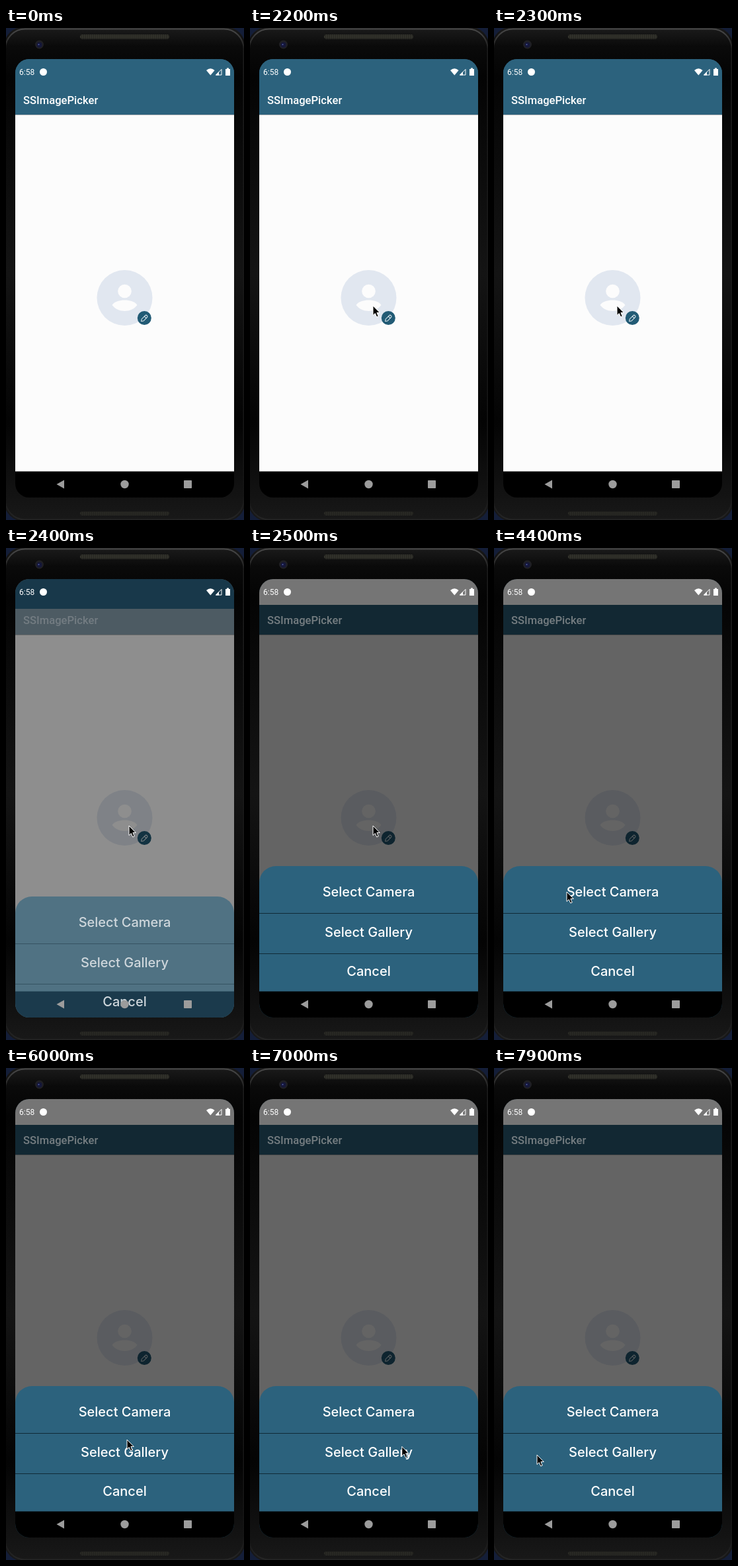
An HTML page for the animation above (8 s loop, 360 by 744 pixels).

```html
<!DOCTYPE html>
<html lang="en">
<head>
<meta charset="utf-8">
<title>Image picker sheet</title>
<style>
  html, body { margin: 0; width: 100%; height: 100%; overflow: hidden; background: #000; }
  svg { display: block; }
  .roboto { font-family: Roboto, sans-serif; }
  #labels text { font: 500 20px Inter, sans-serif; text-anchor: middle; }
</style>
</head>
<body>
<svg width="360" height="744" viewBox="0 0 360 744">
  <defs>
    <clipPath id="screen"><rect x="14" y="47" width="331" height="663" rx="21"/></clipPath>
    <linearGradient id="body" x2="0" y2="1">
      <stop offset="0" stop-color="#1c1c1c"/>
      <stop offset=".04" stop-color="#0a0a0a"/>
      <stop offset=".1" stop-color="#040404"/>
      <stop offset=".5" stop-color="#141414"/>
      <stop offset=".8" stop-color="#040404"/>
      <stop offset=".95" stop-color="#131313"/>
      <stop offset="1" stop-color="#191919"/>
    </linearGradient>
    <linearGradient id="edge" x2="0" y2="1">
      <stop offset="0" stop-color="#4a4a4a"/>
      <stop offset=".04" stop-color="#1c1c1c"/>
      <stop offset=".95" stop-color="#151515"/>
      <stop offset="1" stop-color="#262626"/>
    </linearGradient>
    <pattern id="mesh" width="3" height="3" patternUnits="userSpaceOnUse">
      <rect width="3" height="3" fill="#272722"/><circle cx="1.5" cy="1.5" r=".8" fill="#48483e"/>
    </pattern>
  </defs>

  <!-- phone -->
  <rect width="360" height="744" fill="#141e38"/>
  <rect x="-3" y="-2" width="365" height="748" rx="30" fill="url(#body)"/>
  <rect x="-1" y="1.5" width="360.500" height="742" rx="30" fill="none" stroke="url(#edge)" stroke-width="2"/>
  <rect x="112" y="10" width="135" height="6.5" rx="3" fill="url(#mesh)"/>
  <rect x="112" y="731" width="135" height="6" rx="3" fill="url(#mesh)" opacity=".65"/>
  <circle cx="50.5" cy="25" r="6.5" fill="#202024"/>
  <circle cx="50.5" cy="25.5" r="4" fill="#15173a"/>
  <circle cx="49.5" cy="25" r="1" fill="#5260a8"/>

  <g clip-path="url(#screen)">
    <!-- page -->
    <rect x="14" y="131" width="332" height="540" fill="#fcfcfc"/>
    <circle cx="179.5" cy="408" r="42" fill="#e1e7f0"/>
    <g fill="#fcfcfc">
      <circle cx="179.5" cy="398" r="10.3"/>
      <path d="M160.5 419C164 413.500 172 411.500 179.500 411.500S195 413.500 198.500 419C194 425 187 428 179.500 428S165 425 160.500 419z"/>
    </g>
    <circle cx="209.300" cy="438.500" r="10.500" fill="#225b75"/>
    <g transform="translate(209 439.200) rotate(45)" fill="none" stroke="#e8f0f4" stroke-width="1">
      <path d="M-2 3.500V-4.500a2 1.500 0 0 1 4 0V3.500L0 6zM-2 -2.500H2"/>
    </g>
    <rect id="dim" x="14" y="131" width="332" height="540"/>
    <rect x="14" y="131" width="332" height="1" opacity=".25"/>
    <rect id="bar" x="14" y="47" width="332" height="84"/>
    <rect id="status" x="14" y="47" width="332"/>
    <text id="title" class="roboto" x="26" y="115" font-size="16.6" font-weight="500">SSImagePicker</text>

    <!-- bottom sheet, its labels showing through the navigation bar -->
    <rect id="panel" x="14" y="481" width="331" height="260" rx="25"/>
    <rect id="nav" x="14" y="670.500" width="332" height="40"/>
    <g id="labels">
      <path id="lines" d="M14 552.500H346M14 613.500H346" stroke="#0d2430"/>
      <text x="179.500" y="526.500">Select Camera</text>
      <text x="179.500" y="588">Select Gallery</text>
      <text x="179.500" y="647">Cancel</text>
    </g>

    <!-- system icons -->
    <g fill="#9c9c9c">
      <path d="M76.500 690L88 683.500V696.500z"/>
      <circle cx="179.500" cy="690" r="6.200"/>
      <rect x="269" y="684" width="12" height="12" rx=".8"/>
    </g>
    <g fill="#fff">
      <text class="roboto" x="20" y="71" font-size="12">6:58</text>
      <circle cx="56.500" cy="66.500" r="5.500"/>
      <path d="M303 64Q309.300 58.500 315.600 64L309.300 71.500z"/>
      <path d="M332 62h2v-1.500h3V62h2V72h-7z"/>
      <path d="M317.500 71H326V62.500z" fill="none" stroke="#fff"/>
      <path d="M317 71.500H322V66z"/>
    </g>
  </g>

  <path id="cursor" d="M0 0V14.500L3.300 11.500 5.700 17 8.200 16 5.900 10.500H10.300z" fill="#000" stroke="#fff" stroke-width="1"/>
</svg>

<script>
const LOOP = 8000, STEP = 100;
const $ = id => document.getElementById(id);

const closed = { bar: '#2c627d', status: '#2c627d', statusH: 39, title: '#fff', dim: 0,
                 nav: '#000', panel: '#2c627d', labels: '#fff', lines: .9, drop: 300 };
const opening = { bar: '#4d5b63', status: '#18384a', statusH: 45, title: '#737c82', dim: .44,
                  nav: '#1b3a4c', panel: '#507283', labels: '#cfd7dc', lines: .4, drop: 46 };
const open = { ...closed, bar: '#122833', status: '#757575', title: '#757d81', dim: .6, drop: 0 };

// pointer stops: time, x, y
const path = [
  [200, -14, 470], [900, 186, 420], [2800, 186, 420],
  [3300, 214, 485], [3700, 236, 518], [4100, 178, 509], [4400, 110, 520], [4600, 106, 525],
  [4800, 103, 526], [5200, 200, 530], [5400, 254, 550], [5600, 238, 567],
  [6000, 183, 562], [6400, 38, 575], [6500, 40, 577], [6900, 236, 572],
  [7300, 196, 574], [7700, 32, 590], [7900, 65, 585]
];

function pointer(t) {
  const i = path.findIndex(p => p[0] >= t);
  if (i < 0) return path[path.length - 1].slice(1);
  if (!i) return path[0].slice(1);
  const [a, b] = [path[i - 1], path[i]];
  const k = (t - a[0]) / (b[0] - a[0]), e = k * k * (3 - 2 * k);
  return [1, 2].map(j => a[j] + (b[j] - a[j]) * e);
}

function draw(t) {
  const s = t < 2400 ? closed : t < 2500 ? opening : open;
  for (const id of ['bar', 'status', 'title', 'nav', 'panel', 'labels']) $(id).setAttribute('fill', s[id]);
  for (const id of ['panel', 'labels']) $(id).setAttribute('transform', `translate(0 ${s.drop})`);
  $('status').setAttribute('height', s.statusH);
  $('dim').setAttribute('opacity', s.dim);
  $('lines').setAttribute('opacity', s.lines);
  $('cursor').setAttribute('transform', `translate(${pointer(t)})`);
}

const start = performance.now();
function tick() {
  const t = (performance.now() - start) % LOOP;
  draw(Math.floor(t / STEP) * STEP);
  requestAnimationFrame(tick);
}
tick();
</script>
</body>
</html>
```
